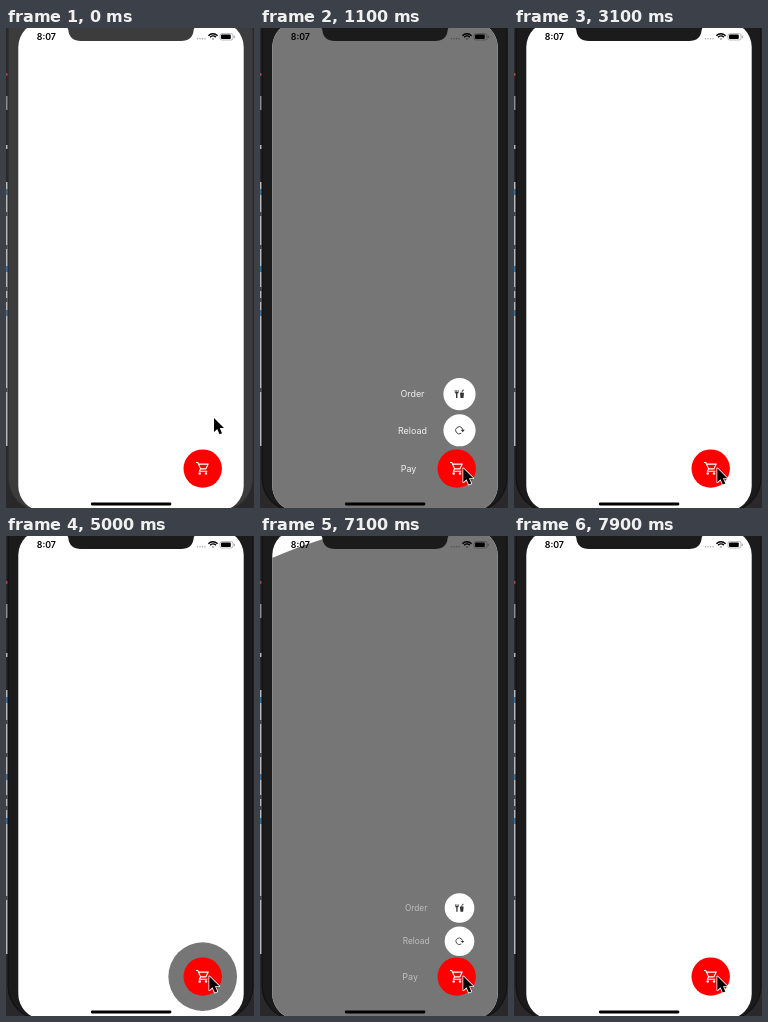
These frames come from a looping animation (248 px wide and 480 px high, 8 s). An HTML page with a canvas:

```html
<!DOCTYPE html>
<html lang="en">
<head>
<meta charset="utf-8">
<title>Floating action menu</title>
<style>
  html, body { margin: 0; width: 100%; height: 100%; overflow: hidden; background: #1a1a1a; }
  canvas { display: block; width: 248px; height: 480px; }
</style>
</head>
<body>
<canvas id="stage"></canvas>
<script>
const W = 248, H = 480, LOOP = 8000, DURATION = 200;
const FAB = { x: 196.7, y: 440.6, r: 19.2 };
const MENU_X = 199.5;
const FONT = 'Inter, Roboto, sans-serif';
// Each toggle flips the menu between closed and open.
const TOGGLES = [910, 2905, 4970, 7066];

const canvas = document.getElementById('stage');
const ctx = canvas.getContext('2d');
const dpr = window.devicePixelRatio || 1;
canvas.width = W * dpr;
canvas.height = H * dpr;

const clamp = v => Math.min(1, Math.max(0, v));
const lerp = (a, b, k) => a + (b - a) * k;

// cubic-bezier(0.42, 0, 1, 1), solved for x by bisection
function easeIn(x) {
  let lo = 0, hi = 1;
  for (let i = 0; i < 24; i++) {
    const s = (lo + hi) / 2, u = 1 - s;
    if (1.26 * s * u * u + 3 * s * s * u + s * s * s < x) lo = s; else hi = s;
  }
  return lo * lo * (3 - 2 * lo);
}

function easeInOut(x) {
  if (x <= 0 || x >= 1) return clamp(x);
  return x < 0.5 ? easeIn(2 * x) / 2 : 1 - easeIn(2 - 2 * x) / 2;
}

function menuProgress(t) {
  return TOGGLES.reduce((p, start, i) =>
    t < start ? p : lerp(i % 2, 1 - i % 2, easeInOut((t - start) / DURATION)), 0);
}

function rect(x, y, w, h, color) {
  ctx.fillStyle = color;
  ctx.fillRect(x, y, w, h);
}

function roundRect(x, y, w, h, r, color) {
  ctx.beginPath();
  ctx.roundRect(x, y, w, h, r);
  ctx.fillStyle = color;
  ctx.fill();
}

function disc(x, y, r, color) {
  ctx.beginPath();
  ctx.arc(x, y, Math.max(0, r), 0, Math.PI * 2);
  ctx.fillStyle = color;
  ctx.fill();
}

function strokePath(d, width, color) {
  ctx.lineWidth = width;
  ctx.strokeStyle = color;
  ctx.lineJoin = 'round';
  ctx.stroke(new Path2D(d));
}

function label(text, x, y, alpha) {
  ctx.globalAlpha = alpha;
  ctx.fillStyle = '#f4f4f4';
  ctx.font = '400 9px ' + FONT;
  ctx.textAlign = 'center';
  ctx.textBaseline = 'alphabetic';
  ctx.fillText(text, x, y);
  ctx.globalAlpha = 1;
}

function drawDesktop() {
  rect(0, 0, W, H, '#29292b');
  rect(0, 68, 2, 14, '#8d8d8d');
  rect(0, 117, 2, 4, '#b5b5b5');
  rect(0, 45, 2, 3, '#a3453f');
  rect(0, 154, 2, 264, '#b9b9b9');
  for (const y of [184, 217, 259, 270, 360]) rect(0, y, 1.5, 4, '#4a4a4a');
  for (const y of [161, 238, 282]) rect(0, y, 2, 6, '#3b77a8');
}

function drawPhone(focused) {
  roundRect(1.5, -30, 246, 514, 34, focused ? '#111' : '#2d2d2d');
  roundRect(2.7, -30, 243.8, 513, 33, focused ? '#1b1b1b' : '#3c3c3c');
}

function clipScreen() {
  ctx.beginPath();
  ctx.roundRect(12.3, -6, 225.4, 489, 25);
  ctx.clip();
}

function drawNotch(focused) {
  ctx.fillStyle = focused ? '#1b1b1b' : '#3c3c3c';
  ctx.fill(new Path2D('M58-1Q62-1 62.3 2Q63.5 13 75 13H175Q186.500 13 187.700 2Q188-1 192-1Z'));
}

function drawStatus() {
  ctx.fillStyle = '#000';
  ctx.font = '600 8.8px ' + FONT;
  ctx.textAlign = 'left';
  ctx.textBaseline = 'alphabetic';
  ctx.fillText('8:07', 30.8, 12.2);

  for (let i = 0; i < 4; i++) disc(191.5 + i * 2.5, 10.7, 0.75, 'rgba(0,0,0,.35)');

  ctx.strokeStyle = '#000';
  ctx.lineWidth = 1.4;
  for (const r of [6.3, 4]) {
    ctx.beginPath();
    ctx.arc(207, 12, r, -Math.PI * 0.76, -Math.PI * 0.24);
    ctx.stroke();
  }
  ctx.beginPath();
  ctx.moveTo(207, 12.2);
  ctx.arc(207, 12, 2, -Math.PI * 0.76, -Math.PI * 0.24);
  ctx.fill();

  ctx.beginPath();
  ctx.roundRect(214, 5.6, 13, 6.4, 1.8);
  ctx.lineWidth = 0.6;
  ctx.strokeStyle = 'rgba(0,0,0,.45)';
  ctx.stroke();
  roundRect(215, 6.5, 9.8, 4.6, 1, '#000');
  rect(227.8, 7.7, 0.9, 2.2, 'rgba(0,0,0,.45)');
}

function iconCutlery() {
  strokePath('M-4.300-4V-1.500M-2.800-4V-1.500M-1.300-4V-1.500', 0.8, '#333');
  strokePath('M-4.300-1.400H-1.300M-2.800-1.400V4', 1.4, '#333');
  ctx.fillStyle = '#333';
  ctx.fill(new Path2D('M0.500-1.500H4.500L4 4H1Z'));
  strokePath('M2.300-1.500L3.200-4H4.500', 0.9, '#333');
}

function iconReload() {
  ctx.beginPath();
  ctx.arc(-0.3, 0, 3.6, Math.PI * 0.3, Math.PI * 2);
  ctx.lineWidth = 1;
  ctx.strokeStyle = '#444';
  ctx.stroke();
  ctx.fillStyle = '#333';
  ctx.fill(new Path2D('M1.300-0.400H5.300L3.300 2Z'));
}

function iconCart() {
  strokePath('M-6.500-5.800H-4.700L-1.900 0.600H3.300L5.700-4.200H-4', 1.1, '#fff');
  strokePath('M-1.900 0.600L-3.200 2.900H4.800', 1.1, '#fff');
  disc(-2.8, 5.2, 1.2, '#fff');
  disc(3.5, 5.2, 1.2, '#fff');
}

function menuItem(name, rise, icon, p, alpha) {
  if (p < 0.01) return;
  ctx.save();
  ctx.translate(MENU_X, FAB.y - rise * p);
  ctx.scale(p, p);
  disc(0, 0, 16.2, '#fff');
  icon();
  label(name, -47.4, 3.4, alpha);
  ctx.restore();
}

function drawMenu(p) {
  const alpha = clamp((p - 0.8) / 0.2);
  if (p > 0) disc(FAB.x, FAB.y, 500 * p, '#767676');
  menuItem('Order', 75, iconCutlery, p, alpha);
  menuItem('Reload', 38.6, iconReload, p, alpha);
  label('Pay', 148.4 + 20 * (1 - p), FAB.y + 3.4, alpha);

  disc(FAB.x, FAB.y, FAB.r, '#fe0000');
  ctx.save();
  ctx.translate(FAB.x - 0.2, FAB.y - 0.3);
  iconCart();
  ctx.restore();
}

function drawCursor(t) {
  const k = clamp((t - 50) / 550), s = k * k * (3 - 2 * k);
  ctx.save();
  ctx.translate(lerp(208, 203.3, s), lerp(390, 440.3, s));
  const arrow = 'M0 0V14L3.200 11L5.500 16.300L8 15.200L5.700 10H10Z';
  strokePath(arrow, 1.6, '#fff');
  ctx.fillStyle = '#000';
  ctx.fill(new Path2D(arrow));
  ctx.restore();
}

function draw(t) {
  const focused = t >= 600;
  ctx.setTransform(dpr, 0, 0, dpr, 0, 0);
  drawDesktop();
  drawPhone(focused);
  ctx.save();
  clipScreen();
  rect(0, 0, W, H, '#fff');
  drawMenu(menuProgress(t));
  drawStatus();
  roundRect(84.8, 474.6, 80.6, 2.8, 1.4, '#000');
  ctx.restore();
  drawNotch(focused);
  drawCursor(t);
}

const start = performance.now();
function tick() {
  draw((performance.now() - start) % LOOP);
  requestAnimationFrame(tick);
}
tick();
</script>
</body>
</html>
```
